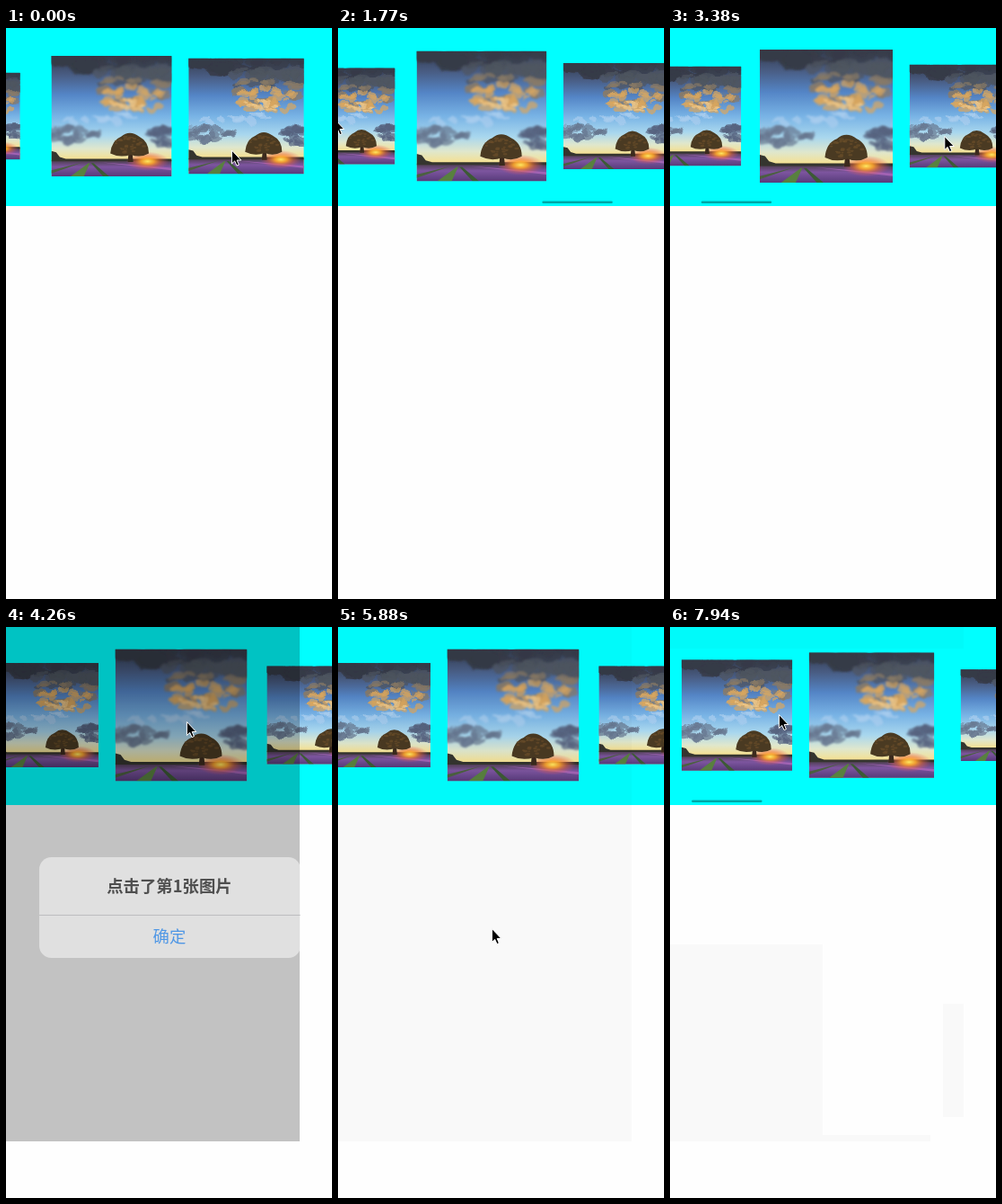
These frames come from a looping animation (363x635 px, 8 s). An HTML page:

```html
<!DOCTYPE html>
<html lang="zh">
<head>
<meta charset="utf-8">
<title>Carousel</title>
<style>
  html, body { margin: 0; width: 100%; height: 100%; overflow: hidden; background: #fefefe; }
  svg { display: block; }
  #stage { width: 100vw; height: 100vh; }
  text { font-family: "Noto Sans CJK SC", "Noto Sans CJK", sans-serif; font-size: 16.5px; text-anchor: middle; }
</style>
</head>
<body>
<svg id="stage" viewBox="0 0 363 635">
  <defs>
    <linearGradient id="sky" x2="0" y2="1">
      <stop offset="0" stop-color="#343b4c"/>
      <stop offset=".16" stop-color="#495d84"/>
      <stop offset=".32" stop-color="#5485c6"/>
      <stop offset=".5" stop-color="#78b3e5"/>
      <stop offset=".66" stop-color="#a9d7ee"/>
      <stop offset=".77" stop-color="#dfe7cd"/>
      <stop offset=".87" stop-color="#f8df88"/>
    </linearGradient>
    <linearGradient id="field" x2="0" y2="1">
      <stop offset="0" stop-color="#4b3d4a"/>
      <stop offset=".4" stop-color="#7d559f"/>
      <stop offset="1" stop-color="#553a78"/>
    </linearGradient>
    <radialGradient id="sun">
      <stop offset="0" stop-color="#ffe860"/>
      <stop offset=".3" stop-color="#ffa52c" stop-opacity=".9"/>
      <stop offset=".6" stop-color="#ee6a3c" stop-opacity=".5"/>
      <stop offset="1" stop-color="#e0507c" stop-opacity="0"/>
    </radialGradient>
    <filter id="ragged">
      <feGaussianBlur stdDeviation=".7"/>
      <feTurbulence type="fractalNoise" baseFrequency=".09" numOctaves="2" result="noise"/>
      <feDisplacementMap in="SourceGraphic" in2="noise" scale="9" xChannelSelector="R" yChannelSelector="G"/>
      <feGaussianBlur stdDeviation=".6"/>
    </filter>
    <symbol id="photo" viewBox="0 0 100 100">
      <rect width="100" height="100" fill="url(#sky)"/>
      <g id="clouds" filter="url(#ragged)"></g>
      <rect y="86.5" width="100" height="14" fill="url(#field)"/>
      <path d="M0 87.5V79l4 1 3 4 5 1.5h88v2Z" fill="#35352f"/>
      <path d="M31 89 16 100H27L32 89Z" fill="#58803f"/>
      <path d="M33 89 43 100H48L35 89Z" fill="#3c5a35"/>
      <path d="M26 88.5 0 95v2.5Z" fill="#4b6040"/>
      <path d="M42 88.5 100 93v2Z" fill="#a263b4"/>
      <ellipse cx="80" cy="87.5" rx="18" ry="8" fill="url(#sun)"/>
      <path d="M63.5 88l1-11h2.5l1 11Z" fill="#3b2a1d"/>
      <path d="M49 81Q50 70 58 67 65 61 73 67 81 71 81 81 74 85 66 82 57 85 49 81Z" fill="#4a3a22"/>
      <g id="leaves"></g>
    </symbol>
    <mask id="unpainted" maskUnits="userSpaceOnUse" width="363" height="635">
      <rect width="363" height="635" fill="#fff"/>
      <g id="holes"></g>
    </mask>
  </defs>
  <rect width="363" height="635" fill="#fefefe"/>
  <rect width="363" height="198" fill="#0ff"/>
  <g id="cards"></g>
  <rect id="bar" y="192.6" width="78.5" height="2.5" rx="1.25" fill-opacity=".35"/>
  <g mask="url(#unpainted)"><rect id="dim" width="363" height="635"/></g>
  <g id="alert">
    <rect x="-130.5" y="-50.2" width="261" height="100.4" rx="12" fill="#f5f5f5"/>
    <path d="M-130.5 7.6h261" stroke="#b4b4b8" stroke-width=".8"/>
    <text x="-.5" y="-15.6" font-weight="600">点击了第1张图片</text>
    <text x="-.5" y="35" fill="#007aff">确定</text>
  </g>
  <path id="pointer" d="M.4 .5V15.5L3.7 12.4 6 17.6 8.4 16.6 6.2 11.5H10.8Z" stroke="#fff"/>
</svg>
<script>
const LOOP = 8000, START = 581, STEP = 147;
const WIDTH = 363, HEIGHT = 635, MID = WIDTH / 2, GAP = 150, COUNT = 10;
const $ = id => document.getElementById(id);

function set(el, attrs) {
  for (const k in attrs) el.setAttribute(k, attrs[k]);
}
function add(parent, tag, attrs) {
  const el = document.createElementNS("http://www.w3.org/2000/svg", tag);
  set(el, attrs);
  return parent.appendChild(el);
}

let seed = 7;
const rand = () => (seed = seed * 16807 % 2147483647) / 2147483647;

// Scatter flat ellipses inside a larger one.
function scatter(parent, fill, n, cx, cy, rx, ry, size) {
  for (let i = 0; i < n; i++) {
    const a = rand() * 2 * Math.PI, r = Math.sqrt(rand()), s = size * (.6 + rand() * .8);
    add(parent, "ellipse", {
      cx: cx + rx * r * Math.cos(a), cy: cy + ry * r * Math.sin(a), rx: s, ry: s / 2, fill, opacity: .7
    });
  }
}

const clouds = $("clouds");
scatter(clouds, "#363b47", 24, 50, 4, 55, 7, 9);
scatter(clouds, "#4f565f", 22, 68, 16, 36, 9, 7);
scatter(clouds, "#8a7a65", 22, 68, 28, 32, 11, 5);
scatter(clouds, "#d8a75f", 36, 68, 36, 28, 10, 4);
scatter(clouds, "#efc888", 14, 62, 42, 20, 5, 3);
scatter(clouds, "#a9cdee", 12, 40, 53, 30, 6, 4);
scatter(clouds, "#66768f", 24, 16, 65, 20, 6, 5);
scatter(clouds, "#56637f", 18, 92, 67, 11, 8, 5);
scatter($("leaves"), "#6a4e2a", 30, 65, 74, 13, 7, 1.6);

const cards = Array.from({ length: COUNT }, () => add($("cards"), "use", { href: "#photo" }));

// Progress from step a to step b, and an ease-out.
const ramp = (s, a, b) => Math.min(1, Math.max(0, (s - a) / (b - a)));
const out = (t, power = 3) => 1 - (1 - t) ** power;

// Drag, fling, drag back, fling back, and a last short drag.
const scrollAt = s => 664 + 8 * ramp(s, 1, 2) + 406 * out(ramp(s, 2, 10))
  - 542.5 * ramp(s, 10, 14) - 399 * out(ramp(s, 14, 22)) - 29.5 * ramp(s, 48, 50);
const barAt = s => ramp(s, 1, 2) - ramp(s, 20, 22) + ramp(s, 48, 49);
const alertAt = s => out(ramp(s, 24, 27), 2.2) - ramp(s, 34, 36);

// Pointer stops: step, x, y.
const stops = [[-1, 251, 135.5], [2, 118, 115], [5, -14, 106], [8, -4, 101], [14, 358, 134], [17, 375, 130],
  [22, 201, 105], [27, 201, 105], [32, 171, 335], [38, 171, 335], [39, 291, 545], [40, 319, 604],
  [43, 340, 660], [44, 305, 399], [45, 324, 333], [48, 91, 100], [50, 121, 97]];

function pointerAt(s) {
  const k = Math.max(1, stops.findIndex(p => p[0] >= s));
  const [a, x, y] = stops[k - 1], [b, x2, y2] = stops[k], t = ramp(s, a, b);
  return [x + (x2 - x) * t, y + (y2 - y) * t];
}

// A faint veil stays after the alert; pointer moves and scrolling wipe it off.
const VEIL = 36, WIPE = 39, SCROLL = 46;
const holes = [];
function wipe(from, x, y, r, b) {
  const el = add($("holes"), "rect", { x, y, width: r - x, height: b - y });
  holes.push({ from, el });
}
for (let s = WIPE; s < SCROLL; s++) {
  const ends = [pointerAt(s - 1), pointerAt(s)].filter(p => p[1] < HEIGHT);
  if (!ends.length) continue;
  const xs = ends.map(p => p[0]), ys = ends.map(p => p[1]);
  wipe(s, Math.min(...xs) - 1, Math.min(...ys), Math.max(...xs) + 13, Math.max(...ys) + 20);
}
wipe(SCROLL, 0, 24, WIDTH, 353);

function draw(s) {
  const scroll = scrollAt(s), p = alertAt(s);
  cards.forEach((card, i) => {
    const x = MID + GAP * i - scroll, dist = Math.abs(x - MID), size = Math.max(0, GAP - dist / 4);
    set(card, {
      x: x - size / 2, y: 98 - size / 2, width: size, height: size,
      display: dist < 290 ? "inline" : "none"
    });
  });
  set($("bar"), { x: 1.5 + .2107 * scroll, opacity: barAt(s) });
  for (const { from, el } of holes) set(el, { display: s >= from ? "inline" : "none" });
  set($("dim"), { opacity: s < VEIL ? .4 * p : .02 });
  const zoom = 1 + .28 * (1 - out(ramp(s, 24, 27), 2.2));
  set($("alert"), { opacity: p, transform: `translate(182.5 312) scale(${zoom})` });
  set($("pointer"), { transform: `translate(${pointerAt(s)})` });
}

const begin = performance.now();
let last;
function tick() {
  const ms = (performance.now() - begin) % LOOP, s = Math.max(-1, Math.floor((ms - START) / STEP));
  if (s !== last) draw(last = s);
  requestAnimationFrame(tick);
}
tick();
</script>
</body>
</html>
```
